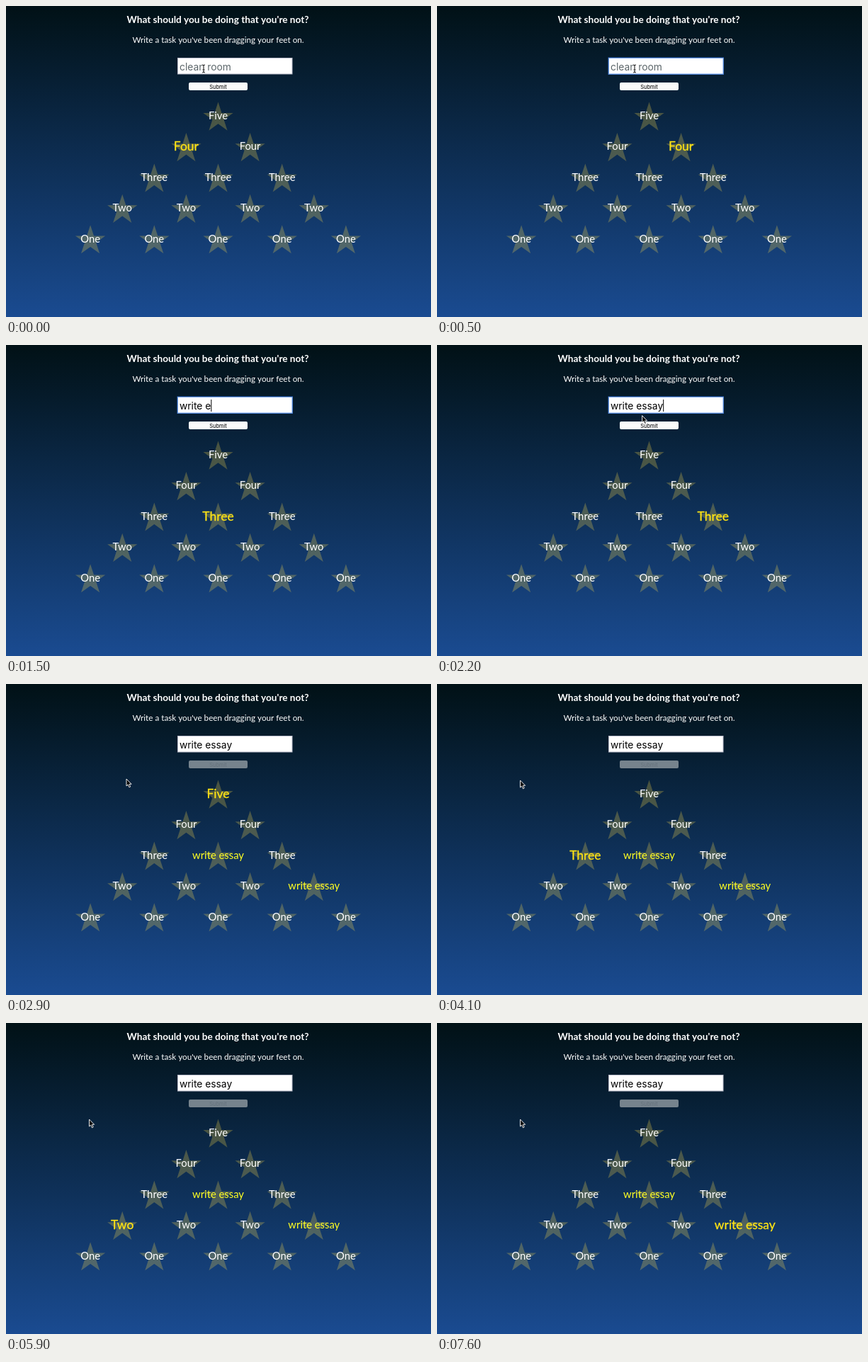
These frames come from a looping animation (600x439 px, 8 s). An HTML page with a canvas:

```html
<!DOCTYPE html>
<html lang="en">
<head>
<meta charset="utf-8">
<title>Task pyramid</title>
<style>
  html, body { margin: 0; width: 100%; height: 100%; overflow: hidden; background: #0e2e53; }
  canvas { display: block; width: 600px; height: 439px; }
</style>
</head>
<body>
<canvas id="stage" width="600" height="439"></canvas>
<script>
const ctx = document.getElementById('stage').getContext('2d');
const LOOP = 8000;
const TASK = 'write essay';
const FOCUS = 200, TYPE_START = 950, TYPE_STEP = 80, SUBMIT = 2400;
const LATO = 'Lato, sans-serif';
const INTER = 'Inter, sans-serif';

const rows = ['Five', 'Four', 'Three', 'Two', 'One'];
const stars = rows.flatMap((label, row) =>
  Array.from({ length: row + 1 }, (_, i) => ({
    label,
    x: 299.5 + (i - row / 2) * 90.2,
    y: 154.7 + row * 43.4,
    chosen: (row === 2 && i === 1) || (row === 3 && i === 3)
  })));

// [start time, highlighted star]; the sweep restarts at the top on submit
const sweep = [
  [0, 1], [400, 2], [900, 3], [1400, 4], [1900, 5],
  [2500, 0], [3000, 1], [3500, 2], [3980, 3], [4600, 4],
  [5200, 5], [5800, 6], [6400, 7], [6900, 8], [7400, 9]
];

// [time, x, y] of the arrow pointer
const pointerPath = [
  [2050, 279, 88], [2350, 300, 111], [2500, 300, 111],
  [2900, 170, 134], [3450, 117.5, 136]
];

function text(str, x, y, font, color, align = 'center') {
  ctx.font = font;
  ctx.fillStyle = color;
  ctx.textAlign = align;
  ctx.fillText(str, x, y);
}

function drawBackground() {
  const sky = ctx.createLinearGradient(0, 0, 0, 439);
  sky.addColorStop(0, '#011116');
  sky.addColorStop(1, '#1a4b91');
  ctx.fillStyle = sky;
  ctx.fillRect(0, 0, 600, 439);
}

function drawStar(star, lit, submitted) {
  ctx.beginPath();
  for (let i = 0; i < 10; i++) {
    const radius = i % 2 ? 8.5 : 22.2;
    const angle = i * Math.PI / 5;
    ctx.lineTo(star.x + radius * Math.sin(angle), star.y + 3.1 - radius * Math.cos(angle));
  }
  ctx.fillStyle = 'rgba(255, 220, 75, .26)';
  ctx.fill();

  const done = submitted && star.chosen;
  const scale = lit ? 1.18 : 1;
  const color = lit ? '#ffe414' : done ? '#ffff22' : '#fff';
  const label = done ? TASK : star.label;
  const baseline = star.y + 5.2 * scale;
  text(label, star.x, baseline, `${14.8 * scale}px ${LATO}`, color);
  if (lit) {
    ctx.strokeStyle = color;
    ctx.lineWidth = .3;
    ctx.strokeText(label, star.x, baseline);
  }
}

function drawInput(t) {
  const focused = t >= FOCUS && t < SUBMIT;
  if (focused) {
    ctx.fillStyle = '#2f62b8';
    ctx.fillRect(241.5, 72.5, 163.5, 24.5);
  }
  ctx.fillStyle = focused ? '#6f9ee6' : '#b9bbc9';
  ctx.fillRect(242, 73, 162.5, 23.5);
  ctx.fillStyle = '#fff';
  ctx.fillRect(243, 74, 160.5, 21.5);

  const count = Math.max(0, Math.floor((t - TYPE_START) / TYPE_STEP) + 1);
  const typed = TASK.slice(0, count);
  text(typed || 'clean room', 245, 91, `13.8px ${INTER}`, typed ? '#000' : '#5c666a', 'left');
  const blinkOn = t < 2300;
  if (typed && focused && blinkOn) {
    ctx.fillStyle = '#000';
    ctx.fillRect(245 + ctx.measureText(typed).width, 77, 1, 17);
  }
}

function drawButton(disabled) {
  ctx.fillStyle = disabled ? '#76838d' : '#fafafa';
  ctx.beginPath();
  ctx.roundRect(258, 108, 83, 11, 2);
  ctx.fill();
  text('Submit', 299.5, 116.5, `7.4px ${INTER}`, disabled ? '#65727c' : '#000');
}

function drawIBeam(x, y) {
  const beam = new Path2D(`M${x - 2} ${y - 5}q2 0 2 1.5v8q0 1.5-2 1.5M${x + 2} ${y - 5}q-2 0-2 1.5v8q0 1.5 2 1.5M${x - 1.5} ${y + 2}h3`);
  ctx.strokeStyle = '#fff';
  ctx.lineWidth = 2.4;
  ctx.stroke(beam);
  ctx.strokeStyle = '#222';
  ctx.lineWidth = 1.1;
  ctx.stroke(beam);
}

function drawArrow(x, y) {
  const arrow = new Path2D(`M${x} ${y}v10l2.2-2 1.7 3.8 1.8-.8-1.7-3.7h3.1z`);
  ctx.fillStyle = '#0a0a0a';
  ctx.fill(arrow);
  ctx.strokeStyle = '#fff';
  ctx.lineWidth = .9;
  ctx.stroke(arrow);
}

function drawPointer(t) {
  if (t < TYPE_START) return drawIBeam(279, 88);
  if (t < pointerPath[0][0]) return;
  const next = pointerPath.findIndex(point => point[0] > t);
  if (next < 0) return drawArrow(...pointerPath.at(-1).slice(1));
  const [t0, x0, y0] = pointerPath[next - 1];
  const [t1, x1, y1] = pointerPath[next];
  const k = (t - t0) / (t1 - t0);
  const ease = k * k * (3 - 2 * k);
  drawArrow(x0 + (x1 - x0) * ease, y0 + (y1 - y0) * ease);
}

function draw(t) {
  const submitted = t >= SUBMIT;
  const litIndex = sweep.findLast(([start]) => start <= t)[1];
  drawBackground();
  text("What should you be doing that you're not?", 299, 24, `bold 13.6px ${LATO}`, '#fff');
  text("Write a task you've been dragging your feet on.", 299.5, 52, `11.7px ${LATO}`, '#fff');
  drawInput(t);
  drawButton(submitted);
  stars.forEach((star, i) => drawStar(star, i === litIndex, submitted));
  drawPointer(t);
}

const begin = performance.now();
function tick() {
  draw((performance.now() - begin) % LOOP);
  requestAnimationFrame(tick);
}
tick();
</script>
</body>
</html>
```
